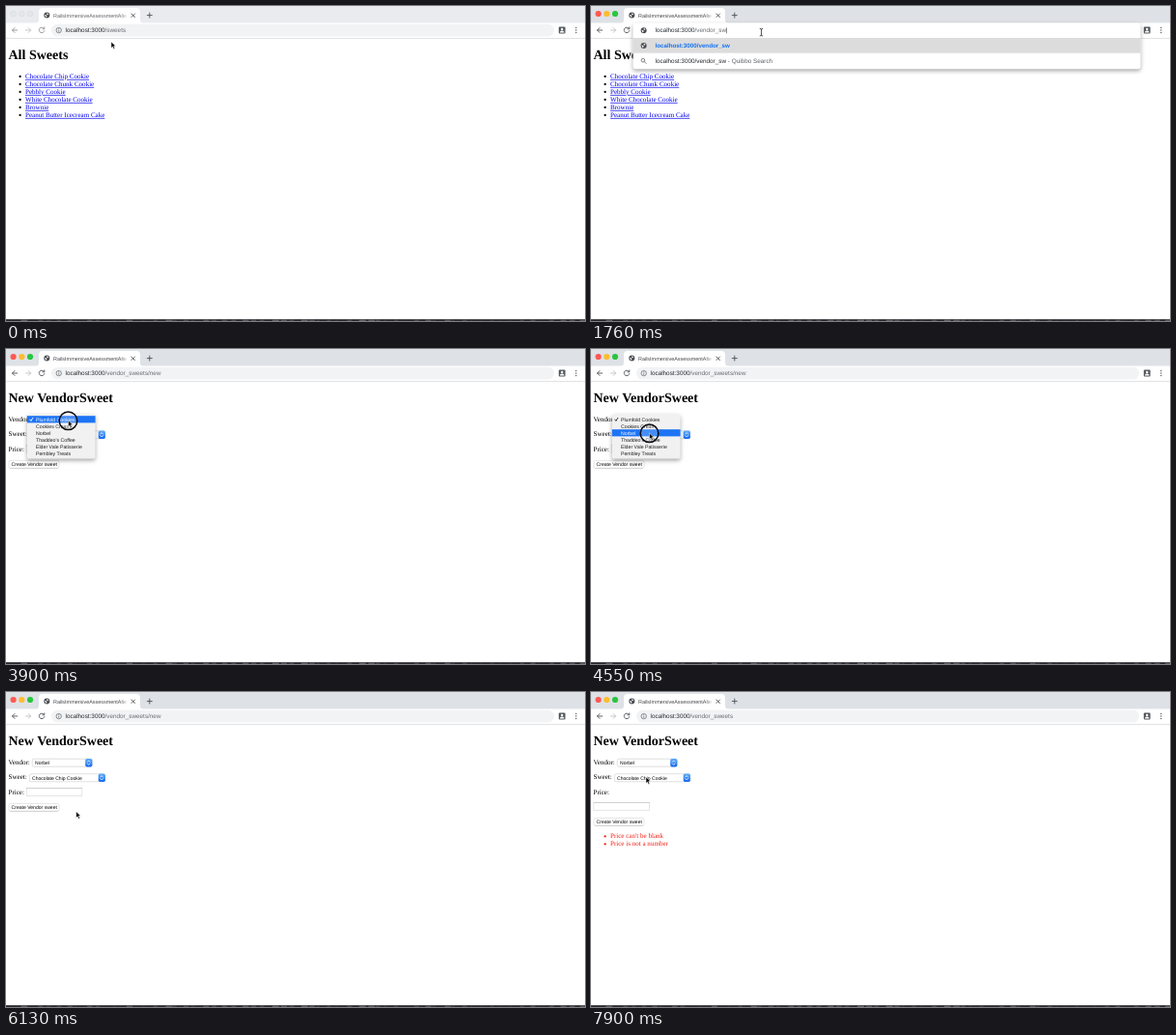
Write an HTML page that moves like this. It is 600 px wide and 326 px high and loops after 8000 ms.

```html
<!DOCTYPE html>
<html lang="en">
<head>
<meta charset="utf-8">
<title>Sweets</title>
<style>
  html, body { margin: 0; width: 100%; height: 100%; overflow: hidden; background: #fff; }
  svg { display: block; width: 100vw; height: 100vh; }
  text { text-rendering: geometricPrecision; white-space: pre; }
  .ui { font-family: "Liberation Sans", Arial, sans-serif; }
  .page { font-family: "Liberation Serif", Times, serif; font-size: 7.06px; }
  .link { text-decoration: underline; text-decoration-thickness: .5px; }
  .url { font-size: 6.36px; }
  .small { font-size: 5.07px; }
  .menu { font-size: 5.2px; }
  .shadow { filter: drop-shadow(0 2px 2px rgba(0, 0, 0, .34)); }
</style>
</head>
<body>
<svg id="stage" viewBox="0 0 600 326" xmlns="http://www.w3.org/2000/svg"></svg>
<script>
const LOOP = 8000, STEP = 92.8, LAST = 85;
const stage = document.getElementById('stage');

const SWEETS = ['Chocolate Chip Cookie', 'Chocolate Chunk Cookie', 'Pebbly Cookie',
  'White Chocolate Cookie', 'Brownie', 'Peanut Butter Icecream Cake'];
const VENDORS = ['Plumfold Cookies', 'Cookies Cream', 'Norbel',
  "Thaddeo's Coffee", 'Elder Vale Patisserie', 'Pembley Treats'];
const HOST = 'localhost:3000';
const TYPED = 'vendor_sweets/new';

// Steps at which things happen.
const AT = { active: 4, focus: 8, type: 10, form: 29, open: 41, pick: 50, blur: 65, errors: 71 };
const CLICKS = [[1, 2], [7, 7], [41, 42], [48, 49], [64, 64], [69, 70]];
// step, x, y
const PATH = [[0, 109, 37], [3, 109, 37], [7, 176.5, 27], [31, 176.5, 27], [37, 66, 79],
  [40, 64.5, 74], [42, 64.5, 74], [46, 62, 87], [50, 60, 87], [55, 58.3, 87.5], [61, 70, 115],
  [62, 70, 115], [64, 72.7, 123.7], [66, 72.7, 123.7], [69, 35, 119], [71, 35, 119], [72, 40, 128],
  [74, 40, 128], [78, 66, 158], [83, 58, 91], [85, 57, 88]];

const rect = (x, y, w, h, fill, more = '') =>
  `<rect x="${x}" y="${y}" width="${w}" height="${h}" fill="${fill}" ${more}/>`;
const circle = (x, y, r, fill, more = '') => `<circle cx="${x}" cy="${y}" r="${r}" fill="${fill}" ${more}/>`;
const line = (d, color, width = .8) =>
  `<path d="${d}" fill="none" stroke="${color}" stroke-width="${width}" stroke-linecap="round" stroke-linejoin="round"/>`;
const text = (x, y, str, cls, fill = '#000', more = '') =>
  `<text x="${x}" y="${y}" class="${cls}" fill="${fill}" ${more}>${str}</text>`;

const DEFS = `<defs>
  <linearGradient id="fade"><stop stop-color="#fff" stop-opacity="0"/><stop offset="1" stop-color="#fff"/></linearGradient>
  <linearGradient id="blue" x2="0" y2="1"><stop stop-color="#62aef9"/><stop offset="1" stop-color="#1468f0"/></linearGradient>
</defs>`;

// Sliver of a dark, speckled desktop below the window.
const DESKTOP = rect(0, 324.2, 600, 1.8, '#26262b') + Array.from({ length: 60 }, (_, i) => {
  const r = Math.abs(Math.sin(i * 12.9898) * 43758.5453) % 1;
  return rect(i * 10 + r * 6, 324.6, 2 + r * 5, 1.4, '#85858c', `opacity="${(r * .6).toFixed(2)}"`);
}).join('');

function cursorAt(k) {
  const i = Math.max(1, PATH.findIndex(p => p[0] >= k));
  const [k0, x0, y0] = PATH[i - 1], [k1, x1, y1] = PATH[i];
  const f = (k - k0) / (k1 - k0);
  return [x0 + (x1 - x0) * f, y0 + (y1 - y0) * f];
}

const globe = (x, y) => circle(x, y, 3, '#484c51') +
  `<path d="M${x - 2.3} ${y - .5}l1.900 .5 .5 1-1 1.200z M${x + .3} ${y - 2.3}l1.600 1.100-1.100 .9-1-.8z" fill="#fff"/>`;

const urlText = (x, path) =>
  text(x, 27.3, `${HOST}<tspan fill="#696d72">/${path}</tspan>`, 'ui url', '#25282c');

function chrome(active) {
  const dark = active ? '#505358' : '#909398';
  const lights = ['#ff5a52', '#febc2e', '#28c63f'].map((c, i) => active
    ? circle(7.6 + 8.7 * i, 8, 3.1, c)
    : circle(7.6 + 8.7 * i, 8, 2.8, '#e4e6e9', 'stroke="#d3d5d8" stroke-width=".5"')).join('');
  return rect(0, 0, 600, 18, active ? '#dee1e6' : '#e9ebef') + lights +
    `<path d="M30 18q4 0 4-4v-8q0-4 4-4h97q4 0 4 4v8q0 4 4 4z" fill="#fff"/>` +
    globe(42.3, 9.6) +
    text(49, 11.5, 'RailsImmersiveAssessmentAlte', 'ui', active ? '#404347' : '#5c5f64', 'font-size="5.45"') +
    rect(118, 5, 9, 9, 'url(#fade)') +
    line('M130 8l3.500 3.500m0-3.500l-3.500 3.500', '#4b4e53', .9) +
    line('M146.300 9.600h5m-2.500-2.500v5', '#4b4e53', .9) +
    rect(0, 17.5, 600, 16, '#fff') + rect(0, 33, 600, .7, '#d4d6d9') +
    line('M11.700 25h-5.200m2.500-2.500l-2.500 2.500 2.500 2.500', dark, .9) +
    line('M20.500 25h5.200m-2.500-2.500l2.500 2.500-2.500 2.500', '#c0c2c5', .9) +
    line('M39.300 23.200a2.800 2.800 0 1 0 .5 2.400M39.800 21.900v1.900h-1.900', dark, .9) +
    rect(572.8, 21.6, 6.8, 7, '#55595e', 'rx="1"') + circle(576.2, 24, 1.2, '#fff') +
    `<path d="M573.900 27.600q0-2 2.300-2t2.300 2z" fill="#fff"/>` +
    [22.5, 25, 27.5].map(y => circle(590.8, y, .7, '#55595e')).join('');
}

const pill = path => rect(47, 18.7, 521, 12.8, '#f1f3f4', 'rx="6.4"') +
  circle(54.7, 25.1, 2.7, 'none', 'stroke="#5f6368" stroke-width=".7"') +
  line('M54.700 25v1.400M54.700 23.600v.1', '#5f6368', .7) + urlText(61.5, path);

const focusedPill = () => rect(47, 18.7, 521, 12.8, '#fff', 'rx="6.4" stroke="#7eaefa" stroke-width="1"') +
  globe(54.6, 25.1) + rect(106, 20.8, 19, 8.6, '#b3d6fc') + urlText(61.5, 'sweets');

function suggestions(typed) {
  const full = `${HOST}/${typed}`;
  return rect(43.5, 17.6, 526, 47.6, '#fff', 'rx="3" class="shadow"') +
    rect(43.5, 33, 526, 15.7, '#dcdcdd') +
    globe(54.6, 25.2) + globe(54.6, 41) +
    urlText(66.5, `${typed}<tspan fill="#222" dx="-.4">|</tspan>`) +
    text(66.5, 43.2, full, 'ui', '#1271ee', 'font-size="6.23" font-weight="700"') +
    circle(53.9, 56.2, 1.8, 'none', 'stroke="#5f6368" stroke-width=".8"') +
    line('M55.300 57.600l1.800 1.800', '#5f6368') +
    text(66.5, 59, `${full}<tspan fill="#5c6065"> - Quibbo Search</tspan>`, 'ui url', '#25282c');
}

const heading = str => text(2.5, 55.2, str, 'page', '#000', 'style="font-size:14px;font-weight:700"');

const bullets = (items, y, color, dot, cls = 'page') => items.map((s, i) =>
  circle(14.6, y + 8 * i - 2, 1.15, dot) + text(20, y + 8 * i, s, cls, color)).join('');

function select(x, y, w, label, inset, focused) {
  const right = x + w - 7, cx = right + 3.5;
  return (focused ? rect(x - .8, y - .8, w + 1.6, 9.6, '#8fc0f5', 'rx="2.4"') : '') +
    rect(x, y, w, 8, '#fff', `rx="1.8" stroke="${focused ? '#68a6ee' : '#c9c9c9'}" stroke-width=".6"`) +
    rect(right, y - .2, 7.2, 8.4, 'url(#blue)', 'rx="1.7"') +
    line(`M${cx - 1.3} ${y + 3.2}l1.3-1.400 1.300 1.400M${cx - 1.3} ${y + 4.8}l1.300 1.400 1.300-1.400`, '#fff', .75) +
    text(x + inset, y + 5.9, label, 'ui small');
}

function form(k) {
  const failed = k >= AT.errors;
  const focused = k >= AT.pick && k < AT.blur;
  const [fx, fy, by] = failed ? [2.8, 114.5, 130.4] : [21.2, 99.6, 115.4];
  return heading('New VendorSweet') +
    text(2.5, 75, 'Vendor:', 'page') + text(2.5, 90.4, 'Sweet:', 'page') + text(2.5, 106, 'Price:', 'page') +
    select(27.2, 69.2, 62, VENDORS[k >= AT.pick ? 2 : 0], 2.8, focused) +
    select(24.3, 84.8, 78.4, SWEETS[0], 2.7, false) +
    rect(fx, fy, 57.6, 7.8, '#fff', 'stroke="#d9d9d9" stroke-width=".7"') +
    line(`M${fx} ${fy}h57.600`, '#c2c2c2', .6) +
    rect(3, by, 52, 8, '#fff', 'rx="1.8" stroke="#d3d3d3" stroke-width=".6"') +
    line(`M4.500 ${by + 8}h49`, '#b8b8b8', .5) +
    text(5.6, by + 5.8, 'Create Vendor sweet', 'ui small') +
    (failed ? bullets(["Price can't be blank", 'Price is not a number'], 151.4, '#f21d12', '#f21d12') : '');
}

function menu(y) {
  const row = Math.max(0, Math.min(5, Math.round((y - 73) / 7)));
  return rect(21.8, 67.6, 70.8, 46, '#f1f1f1', 'rx="2" class="shadow"') +
    rect(21.8, 69.2 + 7 * row, 70.8, 7.2, '#1d74f5') +
    line('M24.800 73l1.100 1.500 1.900-3.200', row ? '#222' : '#fff', .9) +
    VENDORS.map((v, i) => text(31, 74.8 + 7 * i, v, 'ui menu', i === row ? '#fff' : '#1c1c1c')).join('');
}

function pointer(k) {
  const [x, y] = cursorAt(k);
  const ring = CLICKS.some(([a, b]) => k >= a && k <= b)
    ? circle(x, y + .3, 9.3, 'rgba(255,255,255,.18)', 'stroke="#0b0b12" stroke-width="1.5"') : '';
  const shape = y < 32 && x > 47
    ? line(`M${x - 1.3} ${y - 3.6}q1.300 0 1.300 .9q0-.9 1.300-.9M${x} ${y - 2.7}v5.800M${x - 1.3} ${y + 4}q1.300 0 1.300-.9q0 .9 1.300 .9`, '#222', .75)
    : `<path d="M${x} ${y}v6.500l1.500-1.400 1.100 2.500 1.200-.5-1.100-2.500h2z" fill="#000" stroke="#fff" stroke-width=".5"/>`;
  return ring + shape;
}

function scene(k) {
  const typed = TYPED.slice(0, Math.max(0, k - AT.type));
  const onForm = k >= AT.form;
  const page = onForm ? form(k)
    : heading('All Sweets') + bullets(SWEETS, 74.9, '#0000ee', '#000', 'page link');
  const path = !onForm ? 'sweets' : k < AT.errors ? TYPED : 'vendor_sweets';
  const bar = onForm || k < AT.focus ? pill(path) : typed ? suggestions(typed) : focusedPill();
  const popup = k >= AT.open && k < AT.pick ? menu(cursorAt(k)[1]) : '';
  return DEFS + rect(0, 0, 600, 326, '#fff') + chrome(k >= AT.active) + page + bar + popup +
    DESKTOP + pointer(k);
}

let shown = -1;
function draw() {
  const t = performance.now() % LOOP;
  const k = Math.min(LAST, Math.floor((t + 6) / STEP));
  if (k !== shown) stage.innerHTML = scene(shown = k);
  requestAnimationFrame(draw);
}
draw();
</script>
</body>
</html>
```
